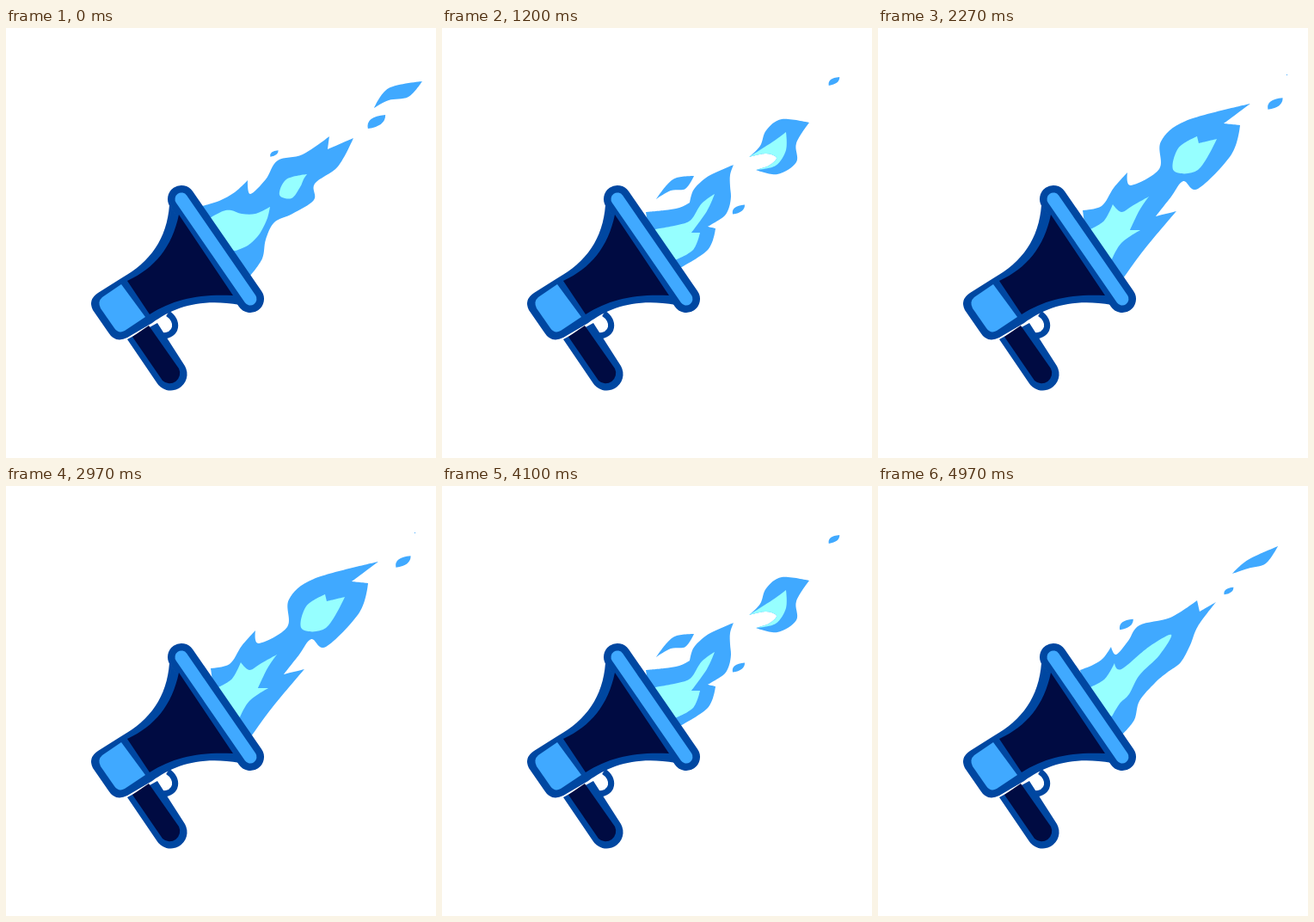
These frames come from a looping animation (500 px wide and 500 px high, 5030 ms). An HTML page:

```html
<!DOCTYPE html>
<html lang="en">
<head>
<meta charset="utf-8">
<title>Flaming megaphone</title>
<style>
  html, body { margin: 0; width: 100%; height: 100%; overflow: hidden; background: #fff; }
  svg { display: block; width: 100vw; height: 100vh; }
</style>
</head>
<body>
<svg viewBox="0 0 500 500">
  <path id="fire" fill="#40a9ff"/>
  <path id="glow" fill="#96ffff"/>

  <!-- trigger and handle -->
  <path d="M188 332C201 340 200 358 181 358" fill="none" stroke="#0047a1" stroke-width="7"/>
  <path d="M141 362L176 343L208 393A19 19 0 0 1 175 412Z" fill="#0047a1"/>
  <path d="M147 359L166 346L201 396A12 12 0 0 1 182 410Z" fill="#000b42"/>

  <!-- horn and rim -->
  <path d="M190 206C187 245 168 272 134 291L107 308Q95 316 101 328L119 354Q127 367 141 360L170 343C195 325 225 314 272 322Z" fill="#0047a1"/>
  <path d="M204 199L284 315" stroke="#0047a1" stroke-width="32" stroke-linecap="round"/>
  <path d="M201 217C193 255 173 279 141 294L167 333C195 315 225 309 264 311Z" fill="#000b42"/>
  <path d="M204 199L284 315" stroke="#40a9ff" stroke-width="15" stroke-linecap="round"/>
  <path d="M134 298L162 336L138 352Q131 356 126 349L110 326Q106 318 112 313Z" fill="#40a9ff"/>
</svg>
<script>
const LOOP = 5030, COUNT = 63;
const fire = document.getElementById('fire');
const glow = document.getElementById('glow');

// "x,y x,y*" -> points; a star marks a sharp corner
const parse = s => s.split(' ').map(p => {
  const [x, y] = p.split(',').map(parseFloat);
  return { x, y, sharp: p.endsWith('*') };
});

const mix = (a, b, k) => a.map((p, i) => ({
  x: p.x + (b[i].x - p.x) * k,
  y: p.y + (b[i].y - p.y) * k,
  sharp: p.sharp || b[i].sharp
}));

// scales about the blob's middle and shifts
const move = (pts, dx, dy, s, cx = 392, cy = 138) => pts.map(p => ({
  x: cx + dx + (p.x - cx) * s,
  y: cy + dy + (p.y - cy) * s,
  sharp: p.sharp
}));

// smooth curve through points; rooted shapes close behind the rim
function curve(pts, rooted) {
  const n = pts.length, at = i => pts[(i + n) % n];
  const slope = i => {
    const end = rooted && (i === 0 || i === n - 1);
    if (end || at(i).sharp) return [0, 0];
    return [(at(i + 1).x - at(i - 1).x) / 6, (at(i + 1).y - at(i - 1).y) / 6];
  };
  let d = `M${pts[0].x} ${pts[0].y}`;
  for (let i = 0; i < (rooted ? n - 1 : n); i++) {
    const a = at(i), b = at(i + 1), u = slope(i), v = slope((i + 1) % n);
    d += `C${a.x + u[0]} ${a.y + u[1]} ${b.x - v[0]} ${b.y - v[1]} ${b.x} ${b.y}`;
  }
  return d + (rooted ? 'L244 257Z' : 'Z');
}
const root = pts => curve(pts, true);

// leaf along the flame's heading, r is half its length
function spark(x, y, r) {
  const a = r * .78, b = -r * .62;
  return `M${x + a} ${y + b}Q${x + b - a * .5} ${y - a - b * .5} ${x - a} ${y - b}` +
         `Q${x - b * .8 + a * .4} ${y + a * .8 + b * .4} ${x + a} ${y + b}Z`;
}

const bodyA = parse('228,207 248,201 266,191 281,177* 284,193 302,176 316,154 345,147 376,126* 374,141* 404,128* 386,161 359,181 358,200 333,216 312,226 302,246 298,268 284,288');
const bodyB = parse('238,212 260,207 274,186 290,168* 294,183 327,164 329,132 358,108 433,88* 402,111* 421,113* 411,147 372,187 355,178 341,196 323,219* 347,213* 310,257 286,290');
const bodyC = parse('237,214 258,212 276,209 288,203* 292,189 302,178 312,171 325,165 339,159* 335,171 335,184 336,196 334,208 329,218 319,225 309,231* 318,233* 309,258 275,280');
const bodyD = parse('235,214 250,208 262,200 271,187* 277,196 291,180 304,162 340,153 371,133* 374,146* 393,135* 372,163 363,185 352,205 336,217 322,229 304,250 298,272 284,289');

const coreA = parse('237,221 252,213 262,212 274,216 290,216 307,208* 304,221 298,234 292,243 281,253 267,259');
const coreB = parse('247,234 263,224 273,205* 283,214 297,206 315,196* 304,212 293,235* 305,235* 283,250 272,269');
const coreC = parse('248,234 270,230 285,226 292,220 302,204 317,193* 308,213 290,238* 300,238* 292,258 271,270');
const coreD = parse('247,234 264,224 275,206* 283,213 315,187 341,173 327,197 304,220 292,242 281,253 272,268');

const heartA = parse('350,170* 326,176 318,194 332,198 342,185 346,176');
const heartB = parse('371,126* 349,140 344,166 372,165 394,129* 373,134*');

const puff = parse('427,110* 395,106 377,119 370,137 357,150* 377,146 389,151 380,160 365,165* 390,170 412,156 412,134');
const puffCore = parse('400,121* 385,132 357,150* 377,146 389,151 380,160 365,165* 388,160 400,142');
const tongue = parse('249,199* 261,183 273,174 293,172* 283,187 266,189');
const stripA = parse('428,93* 445,70 484,62* 468,80 445,84');
const stripD = parse('412,102* 430,86 465,70* 451,90 430,96');

const poses = [
  () => [root(bodyA) + curve(stripA) + spark(312, 146, 6) + spark(431, 109, 13),
         root(coreA) + curve(heartA)],
  () => [root(bodyB) + spark(462, 88, 11) + 'M475 54h1v1h-1Z',
         root(coreB) + curve(heartB)],
  () => [root(mix(bodyC, bodyD, .3)) + curve(move(puff, 18, -14, .95)) +
         curve(move(tongue, 22, -13, .7, 271, 186)) + spark(358, 190, 8) + spark(460, 70, 7),
         root(mix(coreC, coreD, .2)) + curve(move(puffCore, 18, -14, .95))],
  () => [root(mix(bodyC, bodyD, .8)) + curve(move(puff, 38, -36, .6)) +
         spark(286, 166, 10) + spark(394, 140, 7),
         root(mix(coreC, coreD, .7))],
  () => [root(mix(bodyD, bodyA, .5)) + curve(mix(stripD, stripA, .1)) +
         spark(300, 154, 8) + spark(419, 115, 9),
         root(mix(coreD, coreA, .4))],
  () => [root(mix(bodyA, bodyB, .5)) + spark(449, 96, 12) + spark(458, 67, 8),
         root(mix(coreA, coreB, .5)) + curve(mix(heartA, heartB, .5))],
  () => [root(bodyC) + curve(puff) + curve(tongue) + spark(345, 211, 9) + spark(456, 62, 8),
         root(coreC) + curve(puffCore)],
  () => [root(mix(bodyC, bodyD, .55)) + curve(move(puff, 26, -24, .75)) +
         curve(move(tongue, 12, -12, .7, 271, 186)) + spark(376, 164, 8),
         root(mix(coreC, coreD, .45))],
  () => [root(bodyD) + curve(stripD) + spark(289, 161, 10) + spark(408, 122, 7),
         root(coreD)]
];

// drawings change 12.5 times a second, snapped to a 30 fps clock
const startOf = k => Math.round(Math.ceil(k * 12 / 5) * 10 / 3) * 10;

function draw(ms) {
  const t = ms % LOOP;
  let k = COUNT - 1;
  while (k > 0 && startOf(k) > t) k--;
  const [outer, inner] = poses[k % poses.length]();
  fire.setAttribute('d', outer);
  glow.setAttribute('d', inner);
}

const begin = performance.now();
function tick() {
  draw(performance.now() - begin);
  requestAnimationFrame(tick);
}
tick();
</script>
</body>
</html>
```
